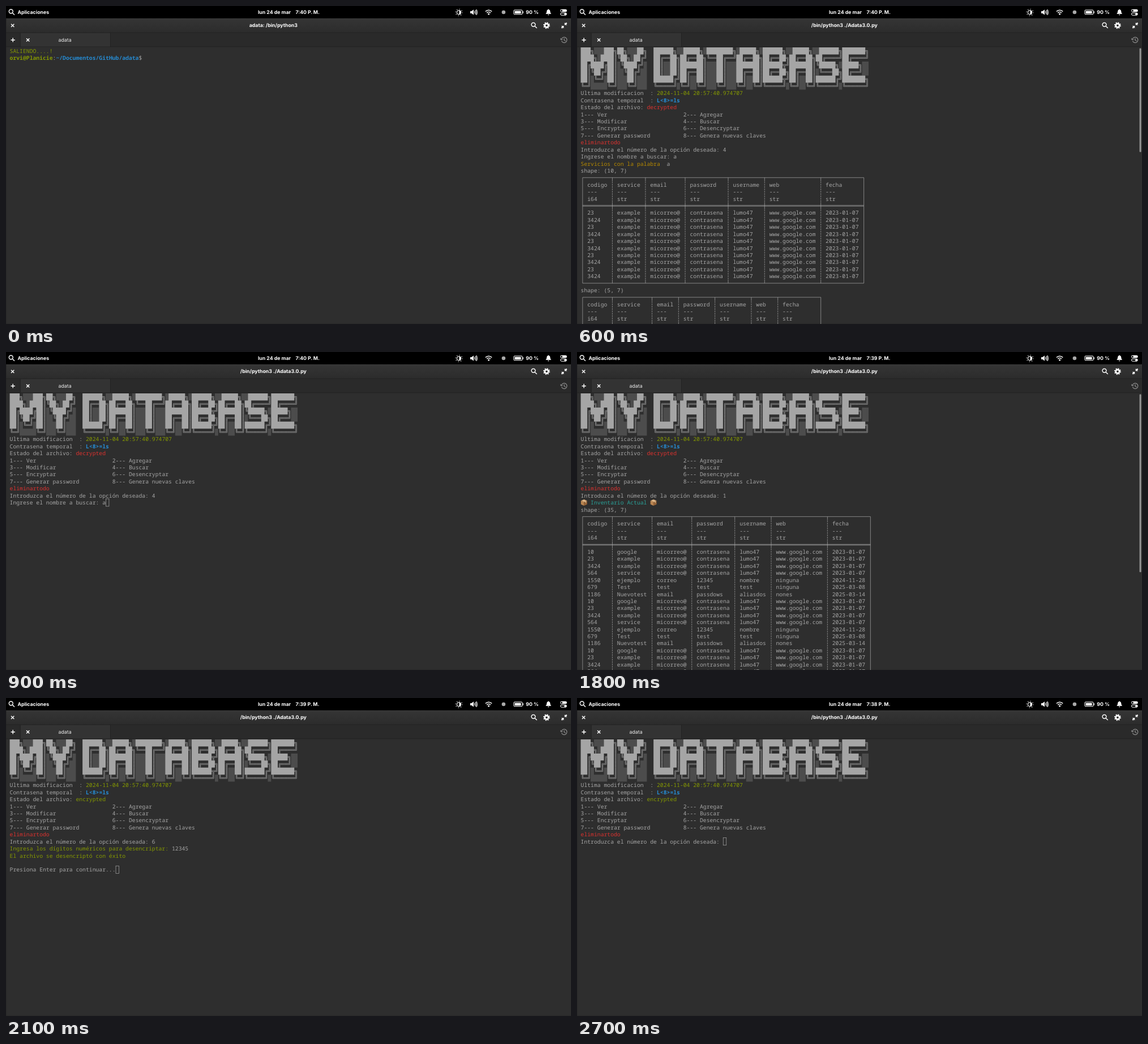
An HTML page for the animation above (3 s loop, 998x561 px).

```html
<!DOCTYPE html>
<html lang="es">
<head>
<meta charset="utf-8">
<title>Terminal</title>
<style>
html, body { margin: 0; width: 100%; height: 100%; overflow: hidden; background: #2e2e2e; }
svg { display: block; width: 100%; height: 100%; }
text { white-space: pre; text-rendering: geometricPrecision; }
.ui { font: 700 12px Inter, "Open Sans", sans-serif; fill: #fff; }
.tab { font-weight: 400; fill: #eee; }
.mid { text-anchor: middle; }
.mono { font: 13.333px "Noto Sans Mono", "DejaVu Sans Mono", monospace; fill: #a5a5a5; }
.b { font-weight: 700; }
.red { fill: #dc322f; }
.green { fill: #859900; }
.yellow { fill: #b58900; }
.blue { fill: #268bd2; }
.cyan { fill: #2aa198; }
.block { fill: #a5a5a5; }
.shade { fill: #4c4c4c; }
.line { fill: none; stroke: #a5a5a5; }
.dash { stroke-dasharray: 4 1.667; stroke-dashoffset: -.8; }
.bar { fill: #979797; }
.ico { fill: none; stroke: #fff; stroke-width: 2; }
.fill { fill: #fff; stroke: none; }
.scene { visibility: hidden; animation: show 3s step-end infinite; }
@keyframes show {
  0% { visibility: visible; }
  10%, 100% { visibility: hidden; }
}
</style>
</head>
<body>
<svg viewBox="0 0 1366 768" preserveAspectRatio="none">
  <defs>
    <linearGradient id="head" x2="0" y2="1">
      <stop stop-color="#353535"/><stop offset="1" stop-color="#2c2c2c"/>
    </linearGradient>
    <g id="box">
      <path fill="#d6a573" d="M8 1L15.5 4.5 8 8 .5 4.5z"/>
      <path fill="#b98450" d="M.5 4.5L8 8V16.5L.5 12.8z"/>
      <path fill="#966338" d="M15.5 4.5L8 8V16.5L15.5 12.8z"/>
      <path fill="#ead0a4" d="M4 2.9L11.5 6.4V9.5L13 8.8V5.7L5.6 2.2z"/>
    </g>
    <path id="cross" d="M-3.6 -3.6L3.6 3.6M3.6 -3.6L-3.6 3.6"/>
    <g id="lens"><circle cx="-1.5" cy="-1.5" r="4.7"/><path d="M2 2L7 7"/></g>
  </defs>

  <rect width="1366" height="768" fill="#2e2e2e"/>
  <rect width="1366" height="30" fill="#000"/>
  <rect y="30" width="1366" height="34" fill="url(#head)"/>
  <rect y="30" width="1366" height="1" fill="#404040"/>
  <rect y="64" width="1366" height="35" fill="#2a2a2a"/>
  <rect x="35" y="65" width="217" height="34" fill="#333"/>
  <path d="M0 64.5H1366M0 98.5H1366M34.5 65V98M252.5 65V98" stroke="#202020"/>
  <path d="M.5 30V768M0 767.5H1366" stroke="#262626"/>

  <text class="ui" x="28" y="19.3">Aplicaciones</text>
  <text class="ui" x="609" y="19.3">lun 24 de mar</text>
  <text class="ui" x="1257" y="19.3">90 %</text>
  <text class="ui tab mid" x="142.5" y="86.3">adata</text>

  <g class="ico">
    <use href="#lens" x="13.5" y="14.5"/>
    <use href="#lens" x="1276.5" y="46.5"/>
    <use href="#cross" x="16" y="47"/>
    <use href="#cross" x="53" y="82"/>
    <path d="M16.7 77V87M11.7 82H21.7"/>
    <!-- gear -->
    <circle cx="1307" cy="47" r="4.4" stroke-width="3.6"/>
    <circle cx="1307" cy="47" r="6.8" stroke-width="2.6" stroke-dasharray="2.67 2.67"/>
    <!-- restore -->
    <path class="fill" d="M1350.5 46V40L1352.4 41.9 1354.6 39.7 1356.8 41.9 1354.6 44.1 1356.5 46zM1348.5 48V54L1346.6 52.1 1344.4 54.3 1342.2 52.1 1344.4 49.9 1342.5 48z"/>
    <!-- history -->
    <g stroke="#8b8b8b" stroke-width="1.7">
      <path d="M1343.6 79A6.6 6.6 0 1 1 1343.2 84M1349.5 78V82.5L1353 84.5"/>
      <path fill="#8b8b8b" stroke="none" d="M1340.5 77.5L1347 81.8H1340.5z"/>
    </g>
    <!-- night light -->
    <circle cx="1095" cy="15.5" r="4.8" stroke-width="1.5"/>
    <path class="fill" d="M1095 10.7A4.8 4.8 0 0 1 1095 20.3Q1098 15.5 1095 10.7zM1095 11V15.5H1099V18L1096 20Z"/>
    <circle cx="1095" cy="15.5" r="8" stroke-width="1.6" stroke-dasharray="1.6 4.683"/>
    <!-- volume -->
    <path class="fill" d="M1122.5 12.2H1126L1130.5 8.5V21.5L1126 17.8H1122.5z"/>
    <path stroke-width="1.6" d="M1132.5 12Q1134.3 15 1132.5 18M1134.8 10Q1138 15 1134.8 20M1137 8.3Q1141.5 15 1137 21.7"/>
    <!-- wifi -->
    <path d="M1159.3 13.2Q1167 6.6 1174.7 13.2M1162.4 16.6Q1167 12.4 1171.6 16.6"/>
    <circle class="fill" cx="1167" cy="19.6" r="2"/>
    <circle cx="1203" cy="15" r="4.5" fill="#aaa" stroke="none"/>
    <!-- battery -->
    <rect x="1227.7" y="9.7" width="20.6" height="10.6" rx="2.5" stroke-width="1.4"/>
    <rect class="fill" x="1230" y="12" width="15" height="6" rx="1"/>
    <path d="M1250 12.5V17.5" stroke-width="1.8"/>
    <!-- bell -->
    <path class="fill" d="M1304.8 19.3Q1307.3 17 1307.3 13 1307.6 9.4 1310.4 8.7 1311.5 6.5 1312.6 8.7 1315.4 9.4 1315.7 13 1315.7 17 1318.2 19.3zM1309.5 20.6H1313.5Q1311.5 24 1309.5 20.6z"/>
    <!-- switches -->
    <rect class="fill" x="1340" y="8" width="16" height="6.4" rx="3.2"/>
    <circle cx="1343.2" cy="11.2" r="2" fill="#000" stroke="none"/>
    <rect x="1340.7" y="16.7" width="14.6" height="5.4" rx="2.7" stroke-width="1.4"/>
    <circle class="fill" cx="1352.4" cy="19.4" r="2.7"/>
  </g>
  <g id="screens"></g>
</svg>

<script>
const CW = 8, RH = 17;
const px = c => 9 + c * CW;
const py = r => 100 + r * RH;
const cx = c => px(c) + 4.5;
const cy = r => py(r) + 8.5;

const esc = s => s.replace(/&/g, '&amp;').replace(/</g, '&lt;');
const text = (r, c, s, cls = '') =>
  `<text class="mono ${cls}" x="${px(c)}" y="${py(r) + 13.4}">${esc(s)}</text>`;
const path = (cls, d) => `<path class="${cls}" d="${d}"/>`;

// A line of text made of alternating strings and classes.
function line(r, ...parts) {
  let col = 0, out = '';
  for (let i = 0; i < parts.length; i += 2) {
    out += text(r, col, parts[i], parts[i + 1]);
    col += parts[i].length;
  }
  return out;
}
const cursor = (r, c) =>
  `<rect class="line" x="${px(c) + .5}" y="${py(r) - .5}" width="7.5" height="18"/>`;
const scrollbar = h => `<rect class="bar" x="1360" y="102" width="4" height="${h}" rx="2"/>`;

const BANNER = [
  '███╗░░░███╗██╗░░░██╗  ██████╗░░█████╗░████████╗░█████╗░██████╗░░█████╗░░██████╗███████╗',
  '████╗░████║╚██╗░██╔╝  ██╔══██╗██╔══██╗╚══██╔══╝██╔══██╗██╔══██╗██╔══██╗██╔════╝██╔════╝',
  '██╔████╔██║░╚████╔╝░  ██║░░██║███████║░░░██║░░░███████║██████╦╝███████║╚█████╗░█████╗░░',
  '██║╚██╔╝██║░░╚██╔╝░░  ██║░░██║██╔══██║░░░██║░░░██╔══██║██╔══██╗██╔══██║░╚═══██╗██╔══╝░░',
  '██║░╚═╝░██║░░░██║░░░  ██████╔╝██║░░██║░░░██║░░░██║░░██║██████╦╝██║░░██║██████╔╝███████╗',
  '╚═╝░░░░░╚═╝░░░╚═╝░░░  ╚═════╝░╚═╝░░╚═╝░░░╚═╝░░░╚═╝░░╚═╝╚═════╝░╚═╝░░╚═╝╚═════╝░╚══════╝'
];
const ARMS = { '═': 'lr', '║': 'ud', '╔': 'rd', '╗': 'ld', '╚': 'ru', '╝': 'lu', '╦': 'lrd' };
const DIR = { l: [-1, 0], r: [1, 0], u: [0, -1], d: [0, 1] };

// Both strokes of every arm of a double-line character.
function doubleLine(ch, x, y) {
  const arms = [...ARMS[ch]].map(a => DIR[a]);
  const has = (dx, dy) => arms.some(a => a[0] === dx && a[1] === dy);
  let d = '';
  for (const [dx, dy] of arms) for (const s of [-1, 1]) {
    const qx = dy ? s : 0, qy = dx ? s : 0;
    const start = has(qx, qy) ? 1 : has(-dx, -dy) ? 0 : -1;
    const endX = dx < 0 ? 4.5 : 3.5, endY = dy < 0 ? 8.5 : 8.5;
    d += `M${x + qx + dx * start} ${y + qy + dy * start}L${x + qx + dx * endX} ${y + qy + dy * endY}`;
  }
  return d;
}

function banner() {
  let block = '', shade = '', lines = '';
  BANNER.forEach((row, r) => {
    for (const m of row.matchAll(/█+|░+|[^█░ ]/g)) {
      const c = m.index, n = m[0].length, ch = m[0][0];
      const run = `M${px(c)} ${py(r)}h${n * CW}v${RH}h${-n * CW}z`;
      if (ch === '█') block += run;
      else if (ch === '░') shade += run;
      else lines += doubleLine(ch, cx(c), cy(r));
    }
  });
  return path('shade', shade) + path('block', block) + path('line', lines);
}
const LOGO = banner();

const MENU = [
  ['1--- Ver', '2--- Agregar'],
  ['3--- Modificar', '4--- Buscar'],
  ['5--- Encryptar', '6--- Desencryptar'],
  ['7--- Generar password', '8--- Genera nuevas claves']
];
function menu(state, option = '') {
  return LOGO +
    line(6, 'Ultima modificacion  : ', '', '2024-11-04 20:57:40.974707', 'green') +
    line(7, 'Contrasena temporal  : ', '', 'L<8>=ls', 'blue b') +
    line(8, 'Estado del archivo: ', '', state, state === 'encrypted' ? 'green' : 'red') +
    MENU.map(([a, b], i) => text(9 + i, 0, a) + text(9 + i, 31, b)).join('') +
    line(13, 'eliminartodo', 'red') +
    line(14, 'Introduzca el número de la opción deseada: ' + option, '');
}

const HEAD = ['codigo', 'service', 'email', 'password', 'username', 'web', 'fecha'];
const TYPES = ['i64', 'str', 'str', 'str', 'str', 'str', 'str'];
const known = (code, name) =>
  [code, name, 'micorreo@', 'contrasena', 'lumo47', 'www.google.com', '2023-01-07'];
const EXAMPLES = [known('23', 'example'), known('3424', 'example')];
const NEWTEST = ['1186', 'Nuevotest', 'email', 'passdows', 'aliasdos', 'nones', '2025-03-14'];
const ITEMS = [
  known('10', 'google'), ...EXAMPLES, known('564', 'service'),
  ['1550', 'ejemplo', 'correo', '12345', 'nombre', 'ninguna', '2024-11-28'],
  ['679', 'Test', 'test', 'test', 'test', 'ninguna', '2025-03-08'],
  NEWTEST
];
const repeat = (rows, n) => Array(n).fill(rows).flat();

function table(r, rows) {
  const top = [HEAD, HEAD.map(() => '---'), TYPES];
  const bars = [0];
  HEAD.forEach((h, i) => {
    const w = Math.max(h.length, ...rows.map(row => row[i].length));
    bars.push(bars[i] + w + 3);
  });
  const end = r + 5 + rows.length, sep = cy(r + 4);
  const x0 = cx(0), x1 = cx(bars.at(-1));
  let solid = `M${x0} ${cy(r)}H${x1}V${cy(end)}H${x0}zM${x0} ${sep - 1}H${x1}M${x0} ${sep + 1}H${x1}`;
  let dashed = '';
  for (const b of bars.slice(1, -1)) {
    const x = cx(b);
    solid += `M${x} ${cy(r)}V${py(r + 1)}M${x} ${py(r + 4)}V${py(r + 5)}M${x} ${py(end)}V${cy(end)}`;
    dashed += `M${x} ${py(r + 1)}V${py(r + 4)}M${x} ${py(r + 5)}V${py(end)}`;
  }
  const cells = (row, y) => y > 39 ? '' : row.map((s, i) => text(y, bars[i] + 2, s)).join('');
  return path('line', solid) + path('line dash', dashed) +
    top.map((row, i) => cells(row, r + 1 + i)).join('') +
    rows.map((row, i) => cells(row, r + 5 + i)).join('');
}

const box = (r, c) => `<use href="#box" x="${px(c)}" y="${py(r)}"/>`;
const ask = 'Ingrese el nombre a buscar: ';
const pause = 'Presiona Enter para continuar...';

const scenes = [
  ['7:40', line(0, 'SALIENDO....!', 'green') +
    line(1, 'orvi@Planicie', 'green b', ':', '', '~/Documentos/GitHub/adata', 'blue b', '$', '')],
  ['7:40', menu('decrypted') +
    line(15, 'Crea clave numérica de máximo 6 digitos:', 'blue', ' 12345', '') + cursor(15, 46)],
  ['7:40', menu('decrypted', '4') + line(15, ask + 'a', '') +
    line(16, 'Servicios con la palabra', 'yellow', '  a', '') +
    line(17, 'shape: (10, 7)', '') + table(18, repeat(EXAMPLES, 5)) +
    line(34, 'shape: (5, 7)', '') + table(35, repeat([NEWTEST], 5)) + scrollbar(251)],
  ['7:40', menu('decrypted', '4') + line(15, ask + 'a', '') + cursor(15, 29)],
  ['7:39', menu('decrypted', '4') + line(15, ask, '') + cursor(15, 28)],
  ['7:39', menu('decrypted', '4') + cursor(14, 44)],
  ['7:39', menu('decrypted', '1') + box(15, 0) + text(15, 3, 'Inventario Actual', 'cyan') + box(15, 21) +
    line(16, 'shape: (35, 7)', '') + table(17, repeat(ITEMS, 5)) + scrollbar(430)],
  ['7:39', menu('encrypted', '6') +
    line(15, 'Ingresa los dígitos numéricos para desencriptar:', 'green', ' 12345', '') +
    line(16, 'El archivo se desencriptó con éxito', 'green') + line(18, pause, '') + cursor(18, 32)],
  ['7:39', menu('encrypted', '1') + line(15, 'El archivo está encriptado', 'red') +
    line(17, pause, '') + cursor(17, 32)],
  ['7:38', menu('encrypted') + cursor(14, 43)]
];

document.getElementById('screens').innerHTML = scenes.map(([clock, body], i) => {
  const title = i ? '/bin/python3 ./Adata3.0.py' : 'adata: /bin/python3';
  const delay = i ? i * 300 - 3000 : 0;
  return `<g class="scene" style="animation-delay:${delay}ms">
    <text class="ui" x="700" y="19.3">${clock} P.\u2009M.</text>
    <text class="ui mid" x="646.5" y="51.2">${title}</text>${body}</g>`;
}).join('');
</script>
</body>
</html>
```
